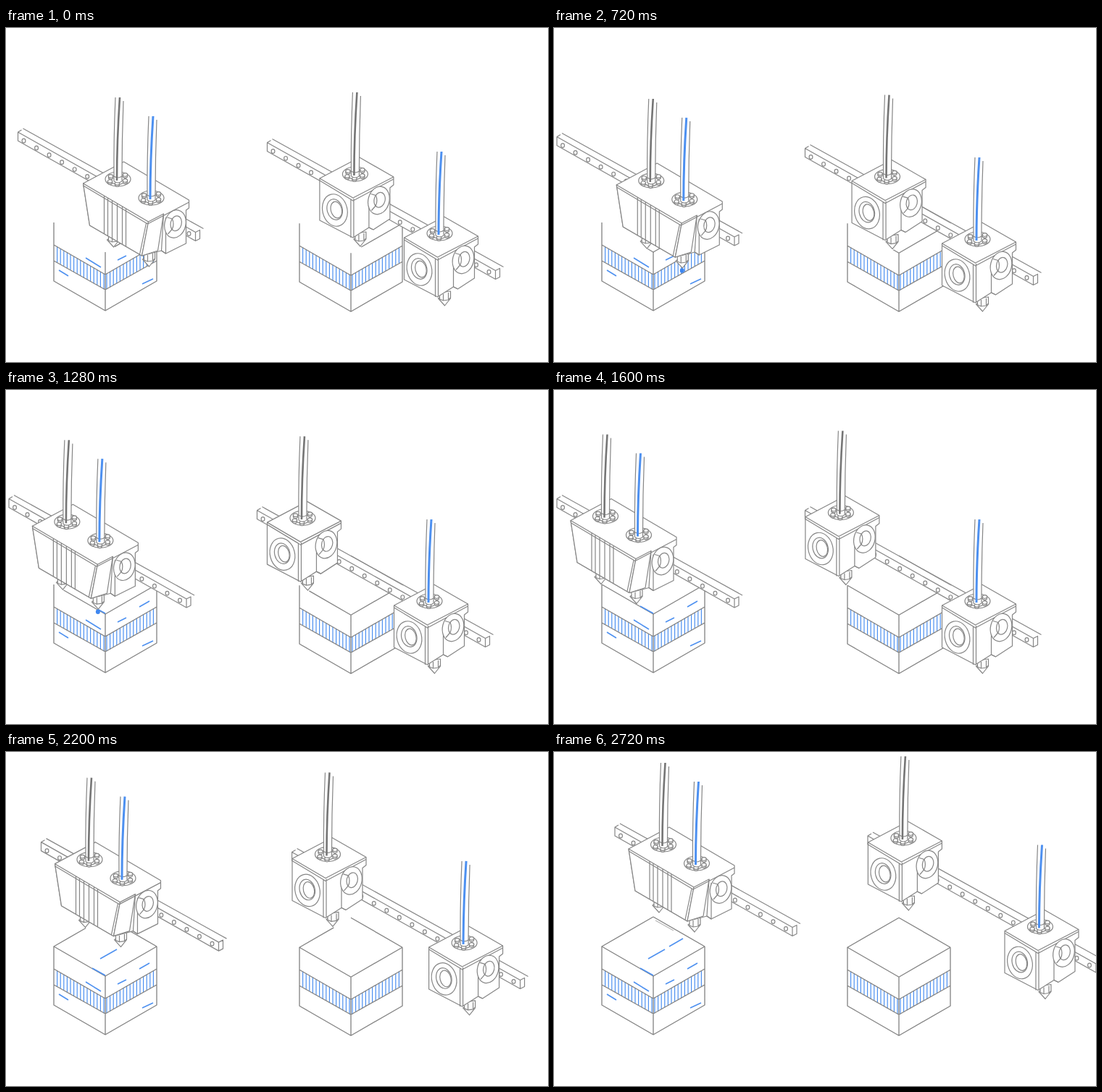
Animation, 748 px wide and 462 px high, one loop 4000 ms. Source, as an HTML page:

```html
<!DOCTYPE html>
<html lang="en">
<head>
<meta charset="utf-8">
<title>Print heads on a gantry</title>
<style>
  html, body { margin: 0; width: 100%; height: 100%; overflow: hidden; background: #fff; }
  svg { display: block; width: 100vw; height: 100vh; }
  path, ellipse { fill: #fff; stroke: #868686; stroke-width: 1.2; stroke-linejoin: round; }
  .open { fill: none; }
  .plain { stroke: none; }
  .cube path { fill: none; stroke: #828282; stroke-width: 1.3; }
  .cube .hatch { stroke: #4d90f0; stroke-width: 1.2; }
  .blue { fill: none; stroke: #4d90f0; stroke-width: 1.5; }
  #core { fill: none; stroke: inherit; stroke-width: inherit; }
  .wire { stroke: #757575; stroke-width: 2.6; }
  .fluid { stroke: #4d90f0; stroke-width: 3; }
  #drop { fill: #3f87f0; stroke: none; }
</style>
</head>
<body>
<svg viewBox="0 0 748 462">
  <defs>
    <path id="core" d="M-1.500 2Q-1.500-52 2.500-113"/>
    <g id="flange">
      <ellipse rx="17.500" ry="10"/>
      <ellipse cy="1" rx="10.500" ry="6.500"/>
      <g id="bolts"></g>
      <path class="plain" d="M-5.500 3V-4Q-6-55-3.500-113L8-110Q5.500-55 5.500-4V3Q0 7-5.500 3Z"/>
      <path class="open" d="M-5.500 3V-4Q-6-55-3.500-113M7.500-108Q5.500-55 5.500-4V3Q0 7-5.500 3M-5.500-4Q0 0 5.500-4"/>
    </g>
    <g id="fan">
      <ellipse rx="14.500" ry="19.500" transform="rotate(14)"/>
      <ellipse cx="1" cy="-1" rx="7.500" ry="10.500" transform="rotate(14)"/>
      <path class="open" d="M-11-9L-4-7M-10 14L-4 7M-4-7Q-1 0-4 7"/>
    </g>
    <g id="nozzle">
      <path d="M-9-10L0 0L8-10L6-12H-6Z"/>
      <path d="M-7-18V-9L-2-7L5-8L8-11V-20Z"/>
      <path class="open" d="M-2-16V-7M5-18V-8"/>
    </g>
    <g id="twin">
      <use href="#nozzle" x="145" y="222"/>
      <use href="#nozzle" x="194" y="249"/>
      <path d="M103 134L159 104L249 157V168L245 171V217L217 231L211 227L184 234L112 192Z"/>
      <path d="M103 134L193 187L184 234L112 192Z"/>
      <path d="M193 187L214 176L206 227L184 234Z"/>
      <path class="open" d="M103 137L192 190L249 160M190 189L181 232M214 176L211 227L217 231V181"/>
      <path class="open" id="ribs"/>
      <use href="#fan" x="230" y="190"/>
      <use href="#flange" x="151" y="128"/>
      <use href="#core" class="wire" x="151" y="128"/>
      <use href="#flange" x="197" y="154"/>
      <use href="#core" class="fluid" x="197" y="154"/>
    </g>
    <g id="single">
      <use href="#nozzle" x="490" y="220"/>
      <path d="M434 126L489 97L536 124V135L531 139V182L508 197L502 194L480 208L434 184Z"/>
      <path class="open" d="M434 126L480 153L536 124M434 129L477 155L480 157L536 127M477 155V208M481 154V207M508 197L502 194V158Q502 148 507 143"/>
      <g transform="rotate(-14 455 170)">
        <ellipse cx="455" cy="170" rx="17" ry="22.500"/>
        <ellipse cx="455" cy="169" rx="10.500" ry="14.500"/>
        <ellipse cx="457" cy="170" rx="7.500" ry="11.500"/>
      </g>
      <use href="#fan" x="515.500" y="156.500"/>
      <use href="#flange" x="483" y="120"/>
      <use href="#core" x="483" y="120"/>
    </g>
    <g id="cube" class="cube">
      <path class="hatch" id="hatch"/>
      <path d="M66 269V350L137 391L208 350V269M137 310V391M66 300L137 341L208 300M66 322L137 362L208 322M137 228L208 269"/>
    </g>
  </defs>

  <use href="#cube"/>
  <g class="cube"><path class="trace" pathLength="3" d="M208 269L137 310L66 269L137 228"/></g>
  <path class="open" d="M140 233L165 247" opacity=".6"/>
  <path class="blue" d="M110 318L131 331M154 321L166 315M73 335L86 343M188 354L203 347M184 300L198 292"/>
  <path class="blue dash" pathLength="1" d="M137 309L119 299"/>
  <path class="blue dash" pathLength="1" d="M130 286L153 273"/>
  <path class="blue dash" pathLength="1" d="M159 269L178 258"/>
  <g id="railL"></g>
  <g id="headL"><use href="#twin"/></g>
  <ellipse id="drop" rx="3" ry="3.200"/>

  <g transform="translate(339 1.200)">
    <use href="#cube"/>
    <g class="cube"><path class="trace" pathLength="3" d="M208 269L137 310L66 269L137 228"/></g>
  </g>
  <g id="railR"></g>
  <g id="headR"><use href="#single" class="wire"/></g>
  <g id="headFixed"><use href="#single" class="fluid"/></g>
</svg>
<script>
const $ = id => document.getElementById(id);
const all = sel => [...document.querySelectorAll(sel)];
const clamp = v => Math.max(0, Math.min(1, v));
const ease = (t, from, to) => (1 - Math.cos(Math.PI * clamp((t - from) / (to - from)))) / 2;

// Static details
$('bolts').innerHTML = [[-10, -4], [-11, 3], [-1, 6], [10, 2], [10, -6]].map(([x, y]) =>
  `<path d="M${x - 3} ${y}v3q3 3 6 0v-3"/><ellipse cx="${x}" cy="${y}" rx="3.2" ry="2.3"/>`).join('');

let ribs = '';
for (const x of [132, 137, 143, 150, 157, 162])
  ribs += `M${x} ${134 + (x - 103) * .59}V${192 + (x - 112) * .583}`;
$('ribs').setAttribute('d', ribs);

let hatch = '';
for (let x = 4.6; x < 70; x += 4.6) {
  const y = 300 + x * .577;
  hatch += `M${66 + x} ${y}v21.5M${208 - x} ${y}v21.5`;
}
$('hatch').setAttribute('d', hatch);

function rail(id, x, y, w, h, holes) {
  let s = `<path class="plain" d="M${x} ${y}l7-6L${x + w + 6} ${y + h - 5}v14l-6 3L${x} ${y + 12}Z"/>
    <path class="open" d="M${x + 7} ${y - 5}l${w + 4} ${h}M${x} ${y}l${w} ${h}v12l${-w} ${-h}Zl5-3M${x + w} ${y + h}l6-3v12l-6 3"/>`;
  for (let i = 0; i < holes; i++) {
    const k = i / (holes - 1);
    s += `<ellipse cx="${x + 8 + k * (w - 17)}" cy="${y + 12 + k * (h - 10)}" rx="2.4" ry="2.8"/>`;
  }
  $(id).innerHTML = s;
}
rail('railL', 84, 104, 245, 138.5, 14);
rail('railR', 433, 116, 315, 177, 18);

const move = (id, x, y) => $(id).setAttribute('transform', `translate(${x} ${y})`);
const reveal = (el, len) => el.setAttribute('stroke-dasharray', `${len} 9`);
const traces = all('.trace'), dashes = all('.dash');

// a: gantry forward, b: head along the rail, c: gantry back
function draw(t) {
  const a = ease(t, 0, 480), b = ease(t, 480, 1600), c = ease(t, 1600, 2720);

  const lx = 12.5 * (1 - a) - 80 * (1 - c), ly = -6.5 * (1 - a) + 46.5 * (1 - c);
  const hx = lx + 71 * (1 - b), hy = ly + 41 * (1 - b);
  move('railL', lx, ly);
  move('headL', hx, hy);

  const rx = 14 * (1 - a) - 86.5 * (1 - c), ry = -8 * (1 - a) + 50.5 * (1 - c);
  move('railR', rx, ry);
  move('headR', rx + 72 * (1 - b) - .6, ry + 40.5 * (1 - b) - 1);
  move('headFixed', rx + 188, ry + 121.5);

  [[.18, 1.12], [.2, 1.2]].forEach(([lead, reach], i) =>
    reveal(traces[i], 1 - lead * (1 - a) + b + Math.min(1, reach * c)));

  const xb = 185 - 71 * b, xc = 114 + 80 * c;
  [(137 - xb) / 18, (xc - 130) / 23, (xc - 159) / 19].forEach((p, i) => reveal(dashes[i], clamp(p)));

  move('drop', 193.5 + hx, 252.5 + hy);
  $('drop').style.display = t >= 320 && t < 1560 ? '' : 'none';
}

const start = performance.now();
function tick() {
  const t = (performance.now() - start) % 4000;
  draw(Math.floor(t / 40) * 40);
  requestAnimationFrame(tick);
}
tick();
</script>
</body>
</html>
```
